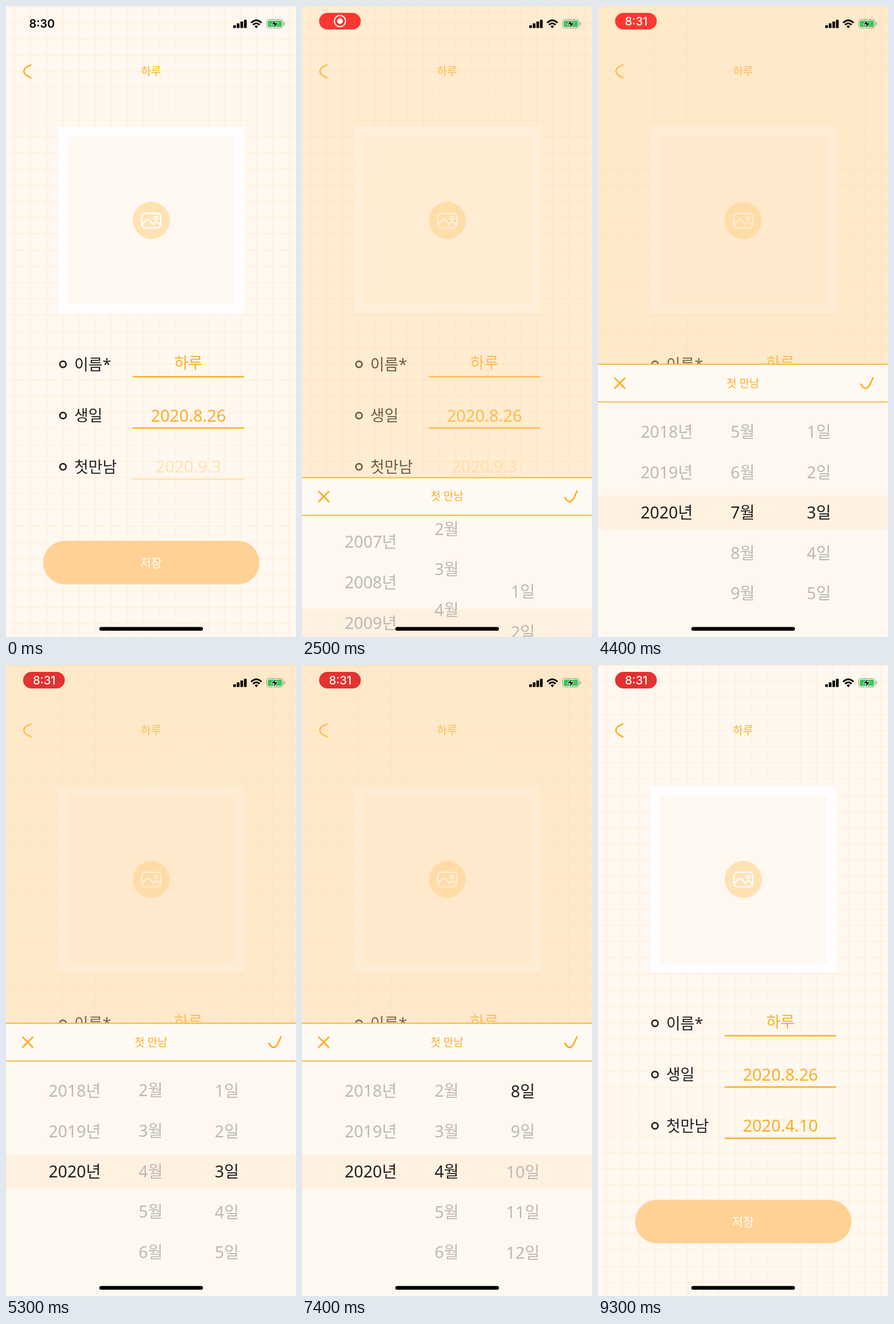
An HTML page for the animation above (9400 ms loop, 508x1102 px).

```html
<!DOCTYPE html>
<html lang="ko">
<head>
<meta charset="utf-8">
<title>첫 만남</title>
<style>
  html, body { margin: 0; width: 100%; height: 100%; overflow: hidden; background: #fff8f0; }
  svg { display: block; width: 508px; height: 1102px; }
  text { font-family: "Noto Sans", "Noto Sans CJK KR", "Noto Sans CJK", sans-serif; text-anchor: middle; }
  .clock { font-family: Inter, "Noto Sans", sans-serif; font-size: 20px; }
  .title { font-size: 19px; fill: #fbae22; }
  .label { font-size: 27px; fill: #231f20; text-anchor: start; }
  .value { font-size: 29px; fill: #fbae22; }
  .row { font-size: 28.5px; fill: #bcb8b7; }
  .row.on { fill: #231f20; }
  .line { fill: none; stroke: #fbae22; stroke-width: 2.7; stroke-linecap: round; stroke-linejoin: round; }
</style>
</head>
<body>
<svg viewBox="0 0 508 1102">
  <defs>
    <pattern id="grid" x="13.7" width="28.3" height="28.35" patternUnits="userSpaceOnUse">
      <path d="M0 1H28.3M1 0V28.35" stroke="#fff1dc" stroke-width="1.8"/>
    </pattern>
    <clipPath id="wheelArea"><rect y="67" width="508" height="388"/></clipPath>
  </defs>

  <rect width="508" height="1102" fill="#fff8f0"/>
  <rect width="508" height="1102" fill="url(#grid)"/>

  <path class="line" d="M43.5 103C38 105 31.3 109 31.3 114S38 123 43.5 125.3"/>
  <text class="title" x="254" y="121">하루</text>

  <rect x="92" y="211.5" width="325" height="326" fill="#fffdff"/>
  <rect x="108.5" y="228.5" width="292.5" height="292.5" fill="#fff8f1"/>
  <circle cx="254.5" cy="374.5" r="32.5" fill="#ffe2b3"/>
  <g fill="none" stroke="#fffdfb" stroke-width="2.6" stroke-linecap="round" stroke-linejoin="round">
    <rect x="238" y="362" width="33" height="25.5" rx="6.5"/>
    <path d="M239 381L246 373.5Q248.500 371.500 251 374L259 382.500M257 380.500L261 377.500Q263 376.500 265 378L270 382"/>
    <circle cx="262.800" cy="370.300" r="2.800"/>
  </g>

  <g id="fields"></g>

  <rect x="65" y="934" width="379" height="76" rx="38" fill="#ffd194"/>
  <text x="254" y="979.500" font-size="21" fill="#fff">저장</text>

  <rect id="shade" width="508" height="1102" fill="#ffd294"/>

  <g id="sheet">
    <rect width="508" height="480" fill="#fff8f0"/>
    <rect y="230" width="508" height="59" fill="#fff1e0"/>
    <g id="wheels" clip-path="url(#wheelArea)"></g>
    <rect width="508" height="67" fill="#fff9f3"/>
    <path d="M0 .8H508M0 66.500H508" stroke="#f6b93b" stroke-width="1.900"/>
    <path class="line" d="M29.500 25L46.800 42.500M46.800 25L29.500 42.500"/>
    <text class="title" x="254" y="40.500">첫 만남</text>
    <path id="check" class="line" d="M460.500 35.500Q464.500 42.800 468.500 42.800C474 42.800 477.500 34 481.500 24.500"/>
  </g>

  <text id="clock" class="clock" x="63" y="38.300" font-weight="600">8:30</text>
  <g id="pill">
    <rect id="pillBody" x="30" y="12" width="73" height="29" rx="14.500"/>
    <g id="record">
      <circle cx="66.500" cy="26.300" r="9.800" fill="none" stroke="#fff" stroke-width="1.900"/>
      <circle cx="66.500" cy="26.300" r="5" fill="#fff"/>
    </g>
    <text id="pillClock" class="clock" x="67" y="33.500" font-weight="500" fill="#fff">8:31</text>
  </g>

  <g id="bars"></g>
  <g fill="none" stroke="#000" stroke-width="2.900">
    <path d="M429.300 29.300Q438.500 20.800 447.700 29.300M432.700 32.900Q438.500 27.600 444.300 32.900"/>
    <path d="M435.300 35.600Q438.500 32.600 441.700 35.600L438.500 38.800Z" fill="#000" stroke="none"/>
  </g>
  <rect x="456.500" y="23.500" width="29" height="15" rx="4.300" fill="none" stroke="#9b948c"/>
  <path d="M487 28.500Q489 29.500 489 31T487 33.500Z" fill="#9b948c"/>
  <rect x="458.500" y="25.500" width="25" height="11" rx="2.600" fill="#34c759"/>
  <path d="M473.500 23.500L464.500 32.400H470L467.800 39L477 29.600H471.300Z" fill="#000" stroke="#fff8f0" stroke-width="1"/>
  <rect x="163.500" y="1084.500" width="181.500" height="6.600" rx="3.300" fill="#000"/>
</svg>

<script>
const LOOP = 9400, STEP = 100;
const ROW = 70.6, CENTER = 260, SHEET_TOP = 625, SHEET_TRAVEL = 478;
const $ = id => document.getElementById(id);

function add(parent, tag, attrs, text = '') {
  const node = document.createElementNS('http://www.w3.org/2000/svg', tag);
  for (const key in attrs) node.setAttribute(key, attrs[key]);
  node.textContent = text;
  parent.append(node);
  return node;
}

for (let i = 0; i < 4; i++) {
  const h = 5 + i * 3.2;
  add($('bars'), 'rect', { x: 398 + i * 6.3, y: 38.5 - h, width: 4.7, height: h, rx: 1.2 });
}

function field(label, value, y, valueY, size) {
  const g = $('fields');
  add(g, 'circle', { cx: 99.8, cy: y, r: 5.4, fill: 'none', stroke: '#231f20', 'stroke-width': 2.8 });
  add(g, 'text', { class: 'label', x: 119.5, y: y + 10 }, label);
  const text = add(g, 'text', { class: 'value', x: 319.5, y: valueY, style: `font-size:${size}px` }, value);
  const line = add(g, 'path', { class: 'line', d: `M223 ${y + 21.7}H416` });
  return { text, line };
}
field('이름*', '하루', 625.8, 633, 27);
field('생일', '2020.8.26', 715.3, 726, 29);
const meeting = field('첫만남', '2020.9.3', 804.8, 815.3, 29);

const clamp = x => Math.max(0, Math.min(1, x));
const span = (t, start, length) => clamp((t - start) / length);
const easeInOut = x => x * x * (3 - 2 * x);
const easeOut = x => 1 - (1 - x) ** 3;

// Each move is [start, duration, value reached].
function wheel(x, first, last, unit, target, moves) {
  const group = add($('wheels'), 'g', {});
  const rows = [];
  for (let v = first; v <= last; v++) {
    rows.push(add(group, 'text', { class: 'row', x, y: CENTER + 10.3 + (v - first) * ROW }, v + unit));
  }
  return t => {
    let position = first + (target - first) * easeInOut(span(t, 2365, 300));
    let selected = target;
    for (const [start, length, to] of moves) {
      position += (to - position) * easeOut(span(t, start, length));
      if (t >= start + length) selected = to;
    }
    group.setAttribute('transform', `translate(0 ${(first - position) * ROW})`);
    rows.forEach((row, i) => row.classList.toggle('on', first + i === selected));
  };
}
const wheels = [
  wheel(120.5, 2001, 2020, '년', 2020, []),
  wheel(253.5, 1, 12, '월', 9, [[3500, 700, 7], [4700, 700, 4]]),
  wheel(387, 1, 30, '일', 3, [[5400, 700, 8], [6800, 700, 10]])
];

function render(t) {
  const open = easeInOut(span(t, 2277, 400)) - easeInOut(span(t, 8106, 400));
  const shade = span(t, 2248, 300) - span(t, 8216, 400);
  $('sheet').setAttribute('transform', `translate(0 ${SHEET_TOP + SHEET_TRAVEL * (1 - open)})`);
  $('shade').setAttribute('opacity', 0.4 * shade);
  $('check').setAttribute('opacity', t >= 8100 ? 0.25 : 1);
  wheels.forEach(update => update(t));

  const saved = t >= 8200;
  meeting.text.textContent = saved ? '2020.4.10' : '2020.9.3';
  meeting.text.style.fill = meeting.line.style.stroke = saved ? '#fbae22' : '#ffe2b6';

  const recording = span(t, 500, 300);
  const timeShown = span(t, 3400, 300);
  const glow = 0.5 + 0.5 * Math.cos((t - 4300) / 1000 * Math.PI);
  $('clock').setAttribute('opacity', 1 - recording);
  $('pill').setAttribute('opacity', recording);
  $('record').setAttribute('opacity', 1 - timeShown);
  $('pillClock').setAttribute('opacity', timeShown);
  $('pillBody').setAttribute('fill', `rgb(${227 + 27 * glow}, ${50 + 6 * glow}, 48)`);
}

const origin = performance.now();
function tick() {
  const t = (performance.now() - origin) % LOOP;
  render(Math.floor(t / STEP) * STEP);
  requestAnimationFrame(tick);
}
tick();
</script>
</body>
</html>
```
